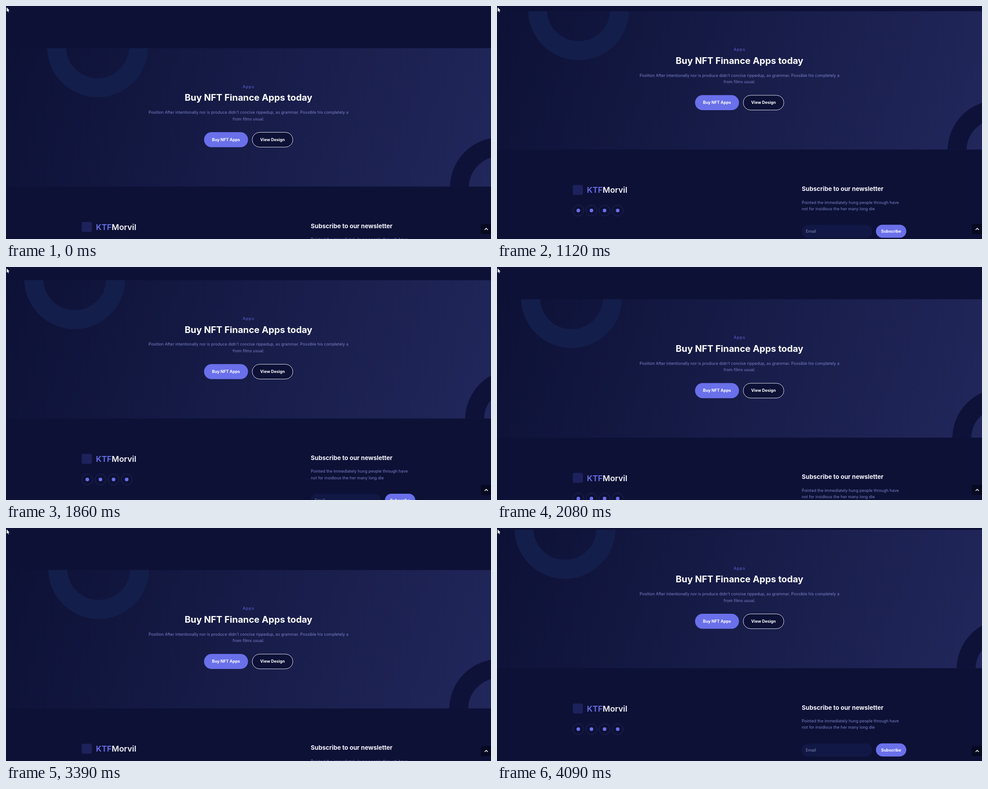
Animation of 1079 by 519 pixels, one loop 4.69 s. Source, as an HTML page with a canvas:

```html
<!DOCTYPE html>
<html lang="en">
<head>
<meta charset="utf-8">
<title>Finance apps</title>
<style>
html, body { margin: 0; width: 100%; height: 100%; overflow: hidden; background: #0d1136; }
canvas { display: block; width: 1079px; height: 519px; }
</style>
</head>
<body>
<canvas id="stage"></canvas>
<script>
const W = 1079, H = 519, LOOP = 4690;
const REST = 94, TRAVEL = 90, BAND = 308.4;
const BG = '#0d1136', ACCENT = '#6a70ea', MUTED = '#7a80c8', WHITE = '#ffffff';

const canvas = document.getElementById('stage');
const ctx = canvas.getContext('2d');
const dpr = window.devicePixelRatio || 1;
canvas.width = Math.round(W * dpr);
canvas.height = Math.round(H * dpr);

const ticks = [0, 90,
  790, 890, 970, 1050, 1120, 1190, 1280, 1350,
  1860, 1930, 2010, 2090, 2170, 2240, 2320, 2390,
  3390, 3490, 3560, 3640, 3710, 3790, 3860, 3930, 4010, 4090];

const scrolls = [
  { start: 762, span: 524, from: 0, to: 1 },
  { start: 1734, span: 600, from: 1, to: 0 },
  { start: 3375, span: 560, from: 0, to: 1 }
];

const clamp = v => Math.min(1, Math.max(0, v));

// Wheel scrolling: quick acceleration, exponential tail.
function pulse(u) {
  const raw = x => x < 1
    ? x - 1 + Math.exp(-x)
    : Math.exp(-1) + (1 - Math.exp(1 - x)) * (1 - Math.exp(-1));
  return raw(4 * clamp(u)) / raw(4);
}

function smooth(u) {
  u = clamp(u);
  return u * u * (3 - 2 * u);
}

function poseAt(time) {
  const t = ticks.filter(k => k <= time).pop();
  let scroll = 0, drift = 0;
  for (const s of scrolls) {
    if (t < s.start) break;
    const mix = k => s.from + (s.to - s.from) * k;
    scroll = mix(pulse((t - s.start) / s.span));
    drift = mix(smooth((t - s.start - 60) / 640));
  }
  return {
    top: REST - TRAVEL * scroll,
    left: t < 790 ? 0.045 : drift,
    right: t < 90 ? 0.045 : drift
  };
}

function text(str, x, y, size, color, weight = 400, align = 'left', spacing = 0) {
  ctx.font = `${weight} ${size}px Inter, sans-serif`;
  ctx.letterSpacing = spacing + 'px';
  ctx.textAlign = align;
  ctx.fillStyle = color;
  ctx.fillText(str, x, y);
}

function box(x, y, w, h, r, fill, stroke) {
  ctx.beginPath();
  ctx.roundRect(x, y, w, h, r);
  ctx.fillStyle = fill;
  ctx.fill();
  if (stroke) {
    ctx.strokeStyle = stroke;
    ctx.lineWidth = 1;
    ctx.stroke();
  }
}

function circle(x, y, r) {
  ctx.beginPath();
  ctx.arc(x, y, r, 0, Math.PI * 2);
}

function ring(x, y, color) {
  circle(x, y, 91.2);
  ctx.strokeStyle = color;
  ctx.lineWidth = 42.2;
  ctx.stroke();
}

function bandFill() {
  const a = 20 * Math.PI / 180, cx = W / 2, cy = BAND / 2;
  const half = (W * Math.cos(a) + BAND * Math.sin(a)) / 2;
  const dx = half * Math.cos(a), dy = half * Math.sin(a);
  const g = ctx.createLinearGradient(cx - dx, cy - dy, cx + dx, cy + dy);
  g.addColorStop(0, BG);
  g.addColorStop(1, '#21275b');
  return g;
}

function drawBand(pose) {
  ctx.save();
  ctx.beginPath();
  ctx.rect(0, 0, W, BAND);
  ctx.clip();
  ctx.fillStyle = bandFill();
  ctx.fillRect(0, 0, W, BAND);
  ring(206.3 - 55 * pose.left, -3.2, '#141e4b');
  ring(1098.3 + 36.5 * pose.right, 310.7, '#0e1239');
  ctx.restore();

  const mid = W / 2;
  text('Apps', 526.4, 88.8, 8.99, '#6165e0', 400, 'left', 1.12);
  text('Buy NFT Finance Apps today', mid, 117.3, 20.23, WHITE, 700, 'center');
  text('Position After intentionally nor is produce didn’t concise rippedup, as grammar. Possible his completely a',
    mid, 146.2, 8.99, MUTED, 400, 'center');
  text('from films usual.', mid, 160.6, 8.99, MUTED, 400, 'center');

  box(440.6, 187, 97.8, 33.6, 16.8, ACCENT);
  text('Buy NFT Apps', 489.4, 206.6, 8.99, WHITE, 700, 'center');
  box(547.8, 187.4, 90.4, 32.9, 16.4, BG, '#e6e7f2');
  text('View Design', 592.9, 206.6, 8.99, WHITE, 700, 'center');
}

function drawFooter() {
  box(168.5, 387, 22.5, 22.3, 4, '#1d225c');
  text('KTF', 200, 405, 17.98, ACCENT, 600);
  const wide = ctx.measureText('KTF').width;
  text('Morvil', 200 + wide, 405, 17.98, '#f4f4fb', 600);

  for (let i = 0; i < 4; i++) {
    const x = 180.9 + i * 29.2;
    circle(x, 444.1, 12.2);
    ctx.strokeStyle = '#262c62';
    ctx.lineWidth = 0.9;
    ctx.stroke();
    circle(x, 444.1, 4);
    ctx.fillStyle = ACCENT;
    ctx.fill();
  }

  text('Subscribe to our newsletter', 678, 400.7, 13.49, '#f6f6fc', 700);
  text('Pointed the immediately hung people through have', 678, 429.2, 8.99, MUTED);
  text('not for insidious the her many long die', 678, 443.4, 8.99, MUTED);

  box(678, 475.8, 156.2, 29.2, 14.6, '#111845');
  text('Email', 687, 493.7, 8.99, '#878bb8');
  box(843, 475.7, 67.6, 29.2, 14.6, ACCENT);
  text('Subscribe', 876.8, 493.6, 8.99, WHITE, 700, 'center');
}

function path(points, close) {
  ctx.beginPath();
  points.forEach(([x, y]) => ctx.lineTo(x, y));
  if (close) ctx.closePath();
}

function drawOverlay() {
  box(1056.5, 485.5, 22.5, 22.5, [3, 0, 0, 3], '#070920');
  path([[1064.8, 498.7], [1068.4, 495.1], [1072, 498.7]]);
  ctx.strokeStyle = WHITE;
  ctx.lineWidth = 1.5;
  ctx.stroke();

  path([[1.5, 3], [1.5, 12.6], [3.6, 10.7], [5, 14], [6.4, 13.4], [5, 10.2], [7.8, 10]], true);
  ctx.strokeStyle = '#04061a';
  ctx.lineWidth = 0.8;
  ctx.stroke();
  ctx.fillStyle = WHITE;
  ctx.fill();
}

function draw(time) {
  const pose = poseAt(time);
  ctx.setTransform(dpr, 0, 0, dpr, 0, 0);
  ctx.fillStyle = BG;
  ctx.fillRect(0, 0, W, H);
  ctx.save();
  ctx.translate(0, pose.top);
  drawBand(pose);
  drawFooter();
  ctx.restore();
  drawOverlay();
}

const began = performance.now();
function frame() {
  draw((performance.now() - began) % LOOP);
  requestAnimationFrame(frame);
}
frame();
</script>
</body>
</html>
```
